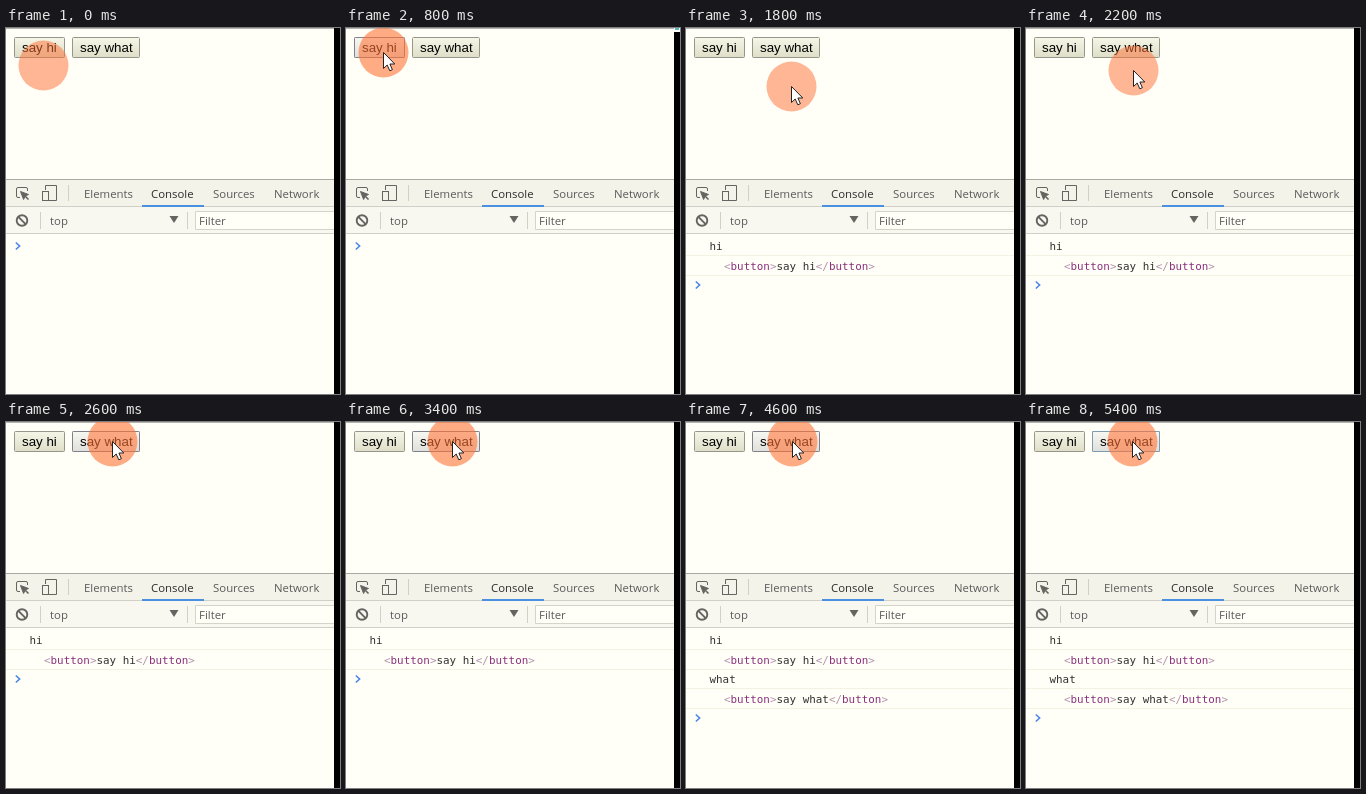
Animation of 334x366 px, one loop 5600 ms. Source, as an HTML page:

```html
<!DOCTYPE html>
<html lang="en">
<head>
<meta charset="utf-8">
<title>Button console log</title>
<style>
  html, body { margin: 0; width: 100%; height: 100%; overflow: hidden; background: #fffff8; }
  svg { display: block; width: 334px; height: 366px; }
  text { white-space: pre; }
  .page { fill: #fffff8; }
  .ui { font: 11.4px "Open Sans", "Noto Sans", sans-serif; fill: #5a5a5a; }
  .label { font: 13.33px "Liberation Sans", Arial, sans-serif; fill: #000; }
  .log { font: 10.9px "DejaVu Sans Mono", monospace; fill: #303030; }
  .tag { fill: #8a2f7c; }
  .angle { fill: #b094ac; }
  .box { fill: url(#face); stroke: #96968a; }
  .rule { fill: #d0d0c8; }
  .row { fill: #f3f3e4; }
  .icon { fill: none; stroke: #646460; }

  .pointer, .arrow, .halo, .press, .focus, .log-hi, .log-what, .prompt, .corner {
    animation: 5600ms step-end infinite;
  }
  .pointer { animation-name: travel; }
  .arrow { animation-name: arrow; }
  .halo { fill: #ff7338; animation-name: halo; }
  .press { fill: url(#lit); stroke: #80808c; }
  .press-hi { animation-name: press-hi; }
  .press-what { animation-name: press-what; }
  .focus { fill: none; stroke: #7c9cb4; animation-name: focus; }
  .log-hi { animation-name: log-hi; }
  .log-what { animation-name: log-what; }
  .prompt { fill: none; stroke: #4a86e8; stroke-width: 1.6; animation-name: prompt; }
  .corner { animation-name: corner; }

  @keyframes travel {
    0%     { transform: translate(37px, 37px); }
    3.57%  { transform: translate(37px, 24px); }
    28.57% { transform: translate(75px, 43px); }
    32.14% { transform: translate(105px, 58px); }
    35.71% { transform: translate(106px, 66px); }
    39.28% { transform: translate(107px, 42px); }
    42.85%, 100% { transform: translate(106px, 19px); }
  }
  @keyframes arrow { 0% { opacity: 0; } 3.57%, 100% { opacity: 1; } }
  @keyframes halo {
    0%     { opacity: .52; }
    14.28% { opacity: .6; }
    17.85% { opacity: .52; }
    46.42%, 100% { opacity: .6; }
  }
  @keyframes press-hi { 0% { opacity: 0; } 14.28% { opacity: 1; } 17.85%, 100% { opacity: 0; } }
  @keyframes press-what { 0% { opacity: 0; } 46.42%, 100% { opacity: 1; } }
  @keyframes focus { 0% { opacity: 0; } 85.71%, 100% { opacity: 1; } }
  @keyframes log-hi { 0% { opacity: 0; } 17.85%, 100% { opacity: 1; } }
  @keyframes log-what { 0% { opacity: 0; } 74.99%, 100% { opacity: 1; } }
  @keyframes prompt {
    0%     { transform: translateY(0); }
    17.85% { transform: translateY(39px); }
    74.99%, 100% { transform: translateY(78px); }
  }
  @keyframes corner {
    0%     { opacity: 0; }
    14.28% { opacity: 1; }
    17.85% { opacity: 0; }
    35.71% { opacity: 1; }
    39.28%, 100% { opacity: 0; }
  }
</style>
</head>
<body>
<svg viewBox="0 0 334 366">
  <defs>
    <linearGradient id="face" x2="0" y2="1">
      <stop offset="0" stop-color="#f6f6e8"/>
      <stop offset="1" stop-color="#dedec8"/>
    </linearGradient>
    <linearGradient id="lit" x2="0" y2="1">
      <stop offset="0" stop-color="#f8f8f2"/>
      <stop offset="1" stop-color="#e0e0da"/>
    </linearGradient>
  </defs>
  <rect class="page" width="334" height="366"/>
  <rect width="328" height="1" fill="#b4b4b0"/>

  <!-- page buttons -->
  <rect class="box" x="8.5" y="9.5" width="50" height="20" rx="1"/>
  <rect class="press press-hi" x="8.5" y="9.5" width="50" height="20" rx="1"/>
  <text class="label" x="16" y="24">say hi</text>
  <rect class="box" x="66.5" y="9.5" width="67" height="20" rx="1"/>
  <rect class="press press-what" x="66.5" y="9.5" width="67" height="20" rx="1"/>
  <rect class="focus" x="66.5" y="9.5" width="67" height="20" rx="1"/>
  <text class="label" x="74" y="24">say what</text>

  <!-- panel tabs -->
  <rect y="151" width="328" height="28" fill="#f3f3ea"/>
  <rect y="179" width="328" height="26" fill="#f8f8f0"/>
  <rect y="151" width="328" height="1" fill="#a8a8a4"/>
  <rect class="rule" y="178" width="328" height="1"/>
  <rect class="rule" y="205" width="328" height="1"/>
  <rect x="136" y="177" width="62" height="2" fill="#4a90e0"/>
  <g class="icon">
    <path d="M14 169.5H12Q10.5 169.5 10.5 168V161Q10.5 159.5 12 159.5H20Q21.5 159.5 21.5 161V163"/>
    <path d="M14.5 163.5L22.5 166.5L19.2 168L17.6 171.5Z" fill="#646460"/>
    <path d="M19 168L22.5 171.5" stroke-width="1.6"/>
    <path d="M39.5 162V157.5H50.5V172.5H43"/>
    <rect x="36.5" y="163.5" width="6" height="9"/>
    <circle cx="16" cy="192.5" r="5.3" stroke-width="1.9"/>
    <path d="M12.4 188.9L19.6 196.1" stroke-width="1.9"/>
  </g>
  <rect class="rule" x="62" y="157" width="1" height="16"/>
  <g class="ui">
    <text x="78" y="170">Elements</text>
    <text x="145" y="170" fill="#2c2c2c">Console</text>
    <text x="207" y="170">Sources</text>
    <text x="268" y="170">Network</text>
  </g>

  <!-- filter bar -->
  <rect class="rule" x="34" y="184" width="1" height="17"/>
  <text class="ui" x="44" y="197">top</text>
  <path d="M163.5 188H172.5L168 195Z" fill="#646460"/>
  <rect class="rule" x="181" y="184" width="1" height="17"/>
  <path class="page" d="M328 183.5H189.5V201.5H328" stroke="#d4d4c8"/>
  <text class="ui" x="193" y="197">Filter</text>

  <!-- console -->
  <g class="log-hi">
    <text class="log" x="23.5" y="222">hi</text>
    <rect class="row" y="227" width="328" height="1"/>
    <text class="log" x="38" y="242"><tspan class="angle">&lt;</tspan><tspan class="tag">button</tspan><tspan class="angle">&gt;</tspan>say hi<tspan class="angle">&lt;/</tspan><tspan class="tag">button</tspan><tspan class="angle">&gt;</tspan></text>
    <rect class="row" y="247" width="328" height="1"/>
  </g>
  <g class="log-what">
    <text class="log" x="23.5" y="261">what</text>
    <rect class="row" y="266" width="328" height="1"/>
    <text class="log" x="38" y="281"><tspan class="angle">&lt;</tspan><tspan class="tag">button</tspan><tspan class="angle">&gt;</tspan>say what<tspan class="angle">&lt;/</tspan><tspan class="tag">button</tspan><tspan class="angle">&gt;</tspan></text>
    <rect class="row" y="286" width="328" height="1"/>
  </g>
  <path class="prompt" d="M9.8 214.5L13.6 218L9.8 221.5"/>

  <!-- right edge -->
  <rect x="328" width="6" height="366" fill="#000"/>
  <g class="corner">
    <rect class="page" x="328" width="6" height="4"/>
    <rect x="329" width="4" height="2" fill="#58b8c8"/>
  </g>

  <g class="pointer">
    <circle class="halo" cx=".5" cy=".5" r="25"/>
    <path class="arrow" d="M.5 .5V16.5L4.2 13L6.8 18.8L9.4 17.7L6.9 12H11.8Z" fill="#fff" stroke="#222"/>
  </g>
</svg>
</body>
</html>
```
